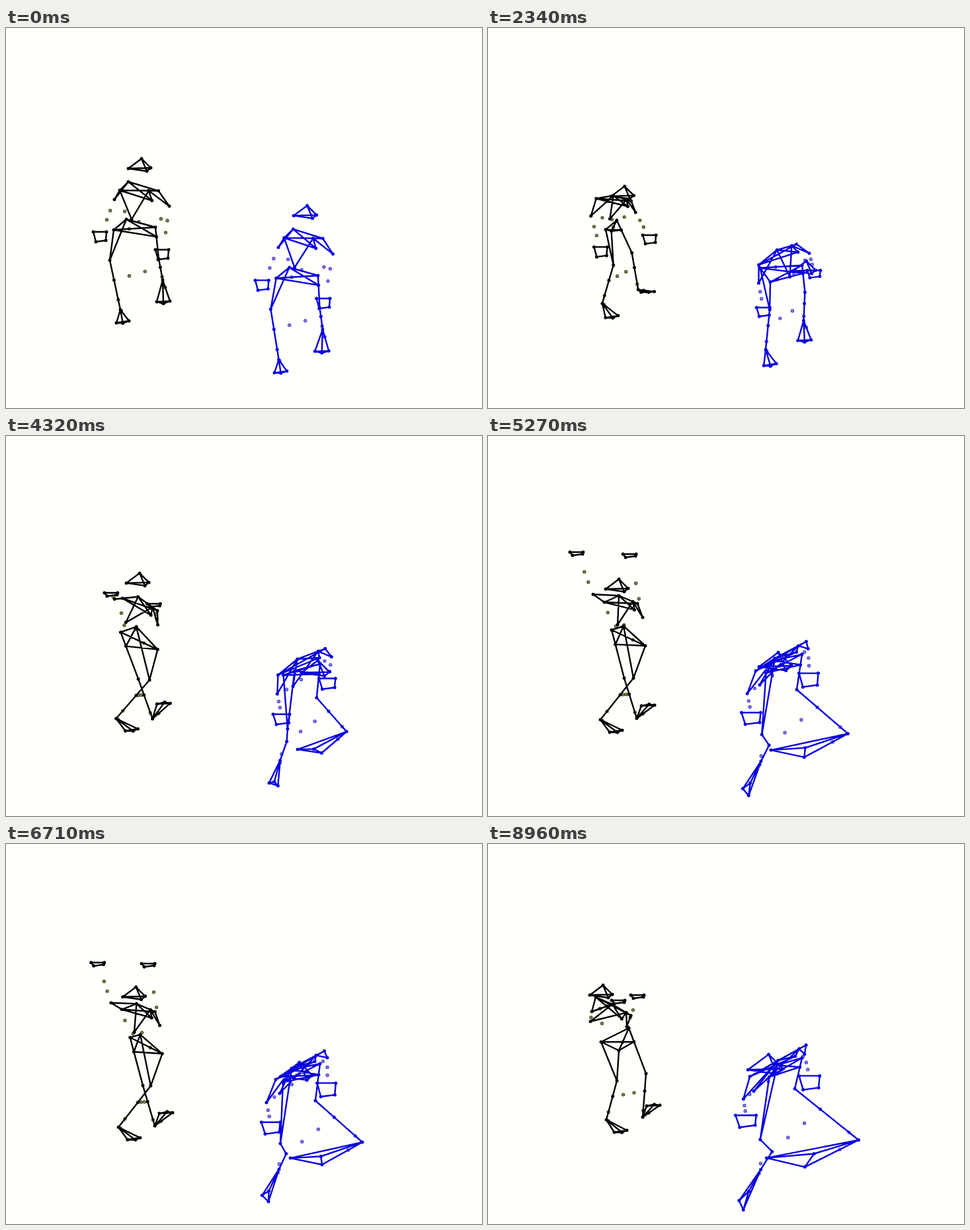
An HTML page for the animation above (9.01 s loop, 720 by 576 pixels).

```html
<!DOCTYPE html>
<html lang="en">
<head>
<meta charset="utf-8">
<title>Two dancers</title>
<style>
html, body { margin: 0; width: 100%; height: 100%; overflow: hidden; background: #fffffb; }
svg { display: block; width: 100vw; height: 100vh; }
path { fill: none; stroke-linecap: round; stroke-linejoin: round; }
</style>
</head>
<body>
<svg id="stage" viewBox="0 0 720 576"></svg>
<script>
const LOOP = 9010, STEP = 45, LAST = 199;
const KEYS = [0, 29, 74, 117, 149, 178, 199];

const mix = (a, b, t) => [a[0] + (b[0] - a[0]) * t, a[1] + (b[1] - a[1]) * t];
const add = (a, x, y) => [a[0] + x, a[1] + y];
const clamp = v => Math.max(0, Math.min(1, v));

const mapPose = (pose, fn) =>
  Object.fromEntries(Object.entries(pose).map(([name, p]) => [name, fn(p, name)]));
const blend = (a, b, t) => mapPose(a, (p, name) => mix(p, b[name], t));

// Key joints only; everything else on the body is worked out in build().
const stand = {
  head: [203, 210], neck: [185, 233], spine: [172, 246], waist: [190, 290],
  armL: [164, 260], armR: [247, 270], handL: [143, 316], handR: [237, 343],
  hipL: [163, 306], sacrum: [182, 290], hipR: [226, 302],
  kneeL: [157, 352], ankleL: [173, 427], toeL: [186, 444],
  kneeR: [231, 350], ankleR: [237, 382], toeR: [248, 414]
};
const bow = {
  head: [204, 280], neck: [157, 271], spine: [178, 259], waist: [202, 298],
  armL: [145, 303], armR: [226, 262], handL: [156, 350], handR: [246, 297],
  hipL: [160, 290], sacrum: [172, 315], hipR: [228, 285],
  kneeL: [168, 348], ankleL: [181, 412], toeL: [197, 433],
  kneeR: [238, 320], ankleR: [236, 370], toeR: [257, 400]
};
const turn = {
  head: [204, 218], neck: [174, 243], spine: [199, 247], waist: [170, 281],
  armL: [167, 260], armR: [225, 294], handL: [185, 308], handR: [233, 329],
  hipL: [214, 325], sacrum: [187, 293], hipR: [167, 299],
  kneeL: [209, 370], ankleL: [165, 425], toeL: [196, 441],
  kneeR: [199, 364], ankleR: [220, 423], toeR: [246, 402]
};
const reach = {
  head: [196, 229], neck: [176, 252], spine: [198, 242], waist: [196, 286],
  armL: [159, 240], armR: [234, 275], handL: [135, 178], handR: [215, 181],
  hipL: [238, 318], sacrum: [205, 288], hipR: [187, 294],
  kneeL: [220, 367], ankleL: [170, 430], toeL: [203, 446],
  kneeR: [206, 367], ankleR: [225, 428], toeR: [252, 408]
};
const fold = {
  head: [172, 226], neck: [163, 232], spine: [188, 243], waist: [162, 272],
  armL: [157, 254], armR: [210, 277], handL: [216, 240], handR: [231, 220],
  hipL: [210, 315], sacrum: [174, 303], hipR: [198, 280],
  kneeL: [202, 361], ankleL: [171, 419], toeL: [202, 435],
  kneeR: [222, 349], ankleR: [226, 415], toeR: [252, 396]
};
const step = {
  ...fold, waist: [155, 269], handL: [198, 239], handR: [227, 231],
  hipL: [198, 313], sacrum: [171, 300], hipR: [213, 279],
  kneeL: [195, 359], ankleL: [179, 418], toeL: [210, 434],
  kneeR: [239, 348], ankleR: [234, 414], toeR: [260, 396]
};
const stoop = {
  head: [498, 364], neck: [417, 366], spine: [445, 339], waist: [457, 381],
  armL: [425, 390], armR: [498, 346], handL: [435, 430], handR: [486, 380],
  hipL: [417, 366], sacrum: [437, 374], hipR: [475, 360],
  kneeL: [435, 434], ankleL: [417, 490], toeL: [430, 514],
  kneeR: [474, 408], ankleR: [484, 445], toeR: [479, 474]
};
const crouch = {
  head: [441, 348], neck: [408, 357], spine: [432, 340], waist: [414, 378],
  armL: [394, 392], armR: [486, 324], handL: [402, 430], handR: [486, 372],
  hipL: [419, 361], sacrum: [432, 342], hipR: [475, 333],
  kneeL: [415, 454], ankleL: [413, 493], toeL: [397, 542],
  kneeR: [468, 389], ankleR: [539, 452], toeR: [478, 486]
};
const lunge = {
  head: [392, 322], neck: [378, 346], spine: [449, 310], waist: [384, 370],
  armL: [375, 378], armR: [468, 310], handL: [376, 404], handR: [490, 345],
  hipL: [435, 341], sacrum: [446, 325], hipR: [475, 311],
  kneeL: [407, 439], ankleL: [412, 494], toeL: [370, 573],
  kneeR: [458, 344], ankleR: [593, 444], toeR: [481, 495]
};

// The blue dancer mirrors the first two poses from a nearer spot.
const beside = pose => mapPose(pose, ([x, y]) =>
  [x + 246 - .05 * (y - 300), y + 73 + .02 * (y - 290)]);

const blackPoses = [stand, bow, turn, reach, blend(reach, fold, .06), fold, step];
const bluePoses = [beside(stand), beside(bow), stoop, blend(crouch, lunge, .1),
  crouch, lunge, blend(crouch, lunge, .4)];

// Cubic curve through the key poses, with slopes taken from the neighbours.
function poseAt(poses, frame) {
  let k = 0;
  while (k < KEYS.length - 2 && frame >= KEYS[k + 1]) k++;
  const span = KEYS[k + 1] - KEYS[k], u = (frame - KEYS[k]) / span;
  const slope = (j, name, axis) => {
    const a = Math.max(j - 1, 0), b = Math.min(j + 1, KEYS.length - 1);
    return (poses[b][name][axis] - poses[a][name][axis]) / (KEYS[b] - KEYS[a]) * span;
  };
  const pose = mapPose(poses[k], (p, name) => p.map((from, axis) => {
    const d = poses[k + 1][name][axis] - from;
    const s = slope(k, name, axis), e = slope(k + 1, name, axis);
    return from + u * (s + u * (3 * d - 2 * s - e + u * (s + e - 2 * d)));
  }));
  const swing = 38 * Math.abs(Math.sin(Math.PI * frame / KEYS[1])) * Math.exp(-frame / 30);
  pose.handL = add(pose.handL, -swing, 0);
  pose.handR = add(pose.handR, swing, 0);
  return pose;
}

// Turns the key joints into edges between points, and free markers.
function build(j) {
  const edges = [], loose = [];
  const star = (from, ...ends) => ends.forEach(p => edges.push([from, p]));
  const ring = (a, b, c, d) => edges.push([a, b], [b, c], [c, d], [d, a]);
  const mesh = (a, b, c, d) => { ring(a, b, c, d); edges.push([a, c], [b, d]); };
  const mark = (a, b, ...steps) => steps.forEach(t => loose.push(mix(a, b, t)));

  const wide = clamp((Math.abs(j.ankleR[0] - j.ankleL[0]) - 64) / 120);
  const size = 1 + .8 * wide;

  const at = (x, y) => add(j.head, x * size, y * size);
  mesh(at(2, -12), at(16, 2), at(10, 7), at(-18, 3));

  const lift = [j.waist[0] - j.spine[0], j.waist[1] - j.spine[1]];
  const shoulder = add(mix(j.armR, j.neck, .15), -.4 * lift[0], -.4 * lift[1]);
  const blade = mix(shoulder, j.spine, .25);
  const rib = mix(j.armR, j.spine, .35);
  star(j.neck, shoulder, j.spine, j.armL, rib);
  star(j.spine, j.armL, shoulder, rib, j.waist);
  star(blade, j.waist, j.armR, rib);
  star(shoulder, j.armR);

  const seat = mix(j.hipR, j.kneeR, .3);
  mesh(j.sacrum, j.hipL, seat, j.hipR);

  const shinL = add(mix(j.kneeL, j.ankleL, .4), 36 * wide * wide, 0);
  const shinR = mix(j.kneeR, j.ankleR, .4);
  star(j.kneeL, j.hipL, j.sacrum, shinL);
  star(j.kneeR, j.hipR, seat, shinR);
  star(shinL, j.ankleL);
  star(shinR, j.ankleR);

  const foot = (ankle, toe, heel) =>
    mesh(ankle, heel, mix(mix(heel, toe, .5), ankle, .7 * wide - .1), toe);
  foot(j.ankleL, j.toeL, add(j.toeL, -19 + 18 * wide, 3 - 24 * wide));
  foot(j.ankleR, j.toeR, add(j.toeR, -20 - 54 * wide, 1 - 21 * wide));

  // A hand held above its shoulder is seen edge-on.
  for (const [arm, hand] of [[j.armL, j.handL], [j.armR, j.handR]]) {
    const h = 2 + 5 * clamp((hand[1] - arm[1]) / 50);
    const corner = (x, y) => add(hand, x * size, y * size);
    ring(corner(-11, -h), corner(9, -h), corner(8, h - 1), corner(-7, h + 1));
    mark(arm, hand, .3, .55);
  }
  mark(j.armL, j.waist, .6);
  mark(j.waist, j.hipR, .3);
  mark(j.armR, j.hipR, .6);
  mark(j.hipL, j.hipR, .37);
  mark(shinL, shinR, .33, .67);
  mark(j.kneeR, j.ankleR, .85);
  mark(j.ankleR, j.toeR, .35);
  mark(j.kneeL, j.ankleL, .8);
  mark(j.ankleL, j.toeL, .1);
  return { edges, loose };
}

function addPath(color, width) {
  const path = document.createElementNS('http://www.w3.org/2000/svg', 'path');
  path.setAttribute('stroke', color);
  path.setAttribute('stroke-width', width);
  document.getElementById('stage').append(path);
  return path;
}

const makeDancer = (poses, color, rim, core) => ({
  poses,
  rim: addPath(rim, 5.4),
  core: addPath(core, 3.4),
  lines: addPath(color, 2.4),
  joints: addPath(color, 5)
});

const dancers = [
  makeDancer(blackPoses, '#000', '#4c4c22', '#80804a'),
  makeDancer(bluePoses, '#0900e0', '#493fc8', '#8480ee')
];

const xy = p => p.map(v => v.toFixed(1)).join(' ');
const dots = points => points.map(p => `M${xy(p)}h0`).join('');

function draw(dancer, frame) {
  const { edges, loose } = build(poseAt(dancer.poses, frame));
  dancer.lines.setAttribute('d', edges.map(([a, b]) => `M${xy(a)}L${xy(b)}`).join(''));
  dancer.joints.setAttribute('d', dots(edges.flat()));
  dancer.rim.setAttribute('d', dots(loose));
  dancer.core.setAttribute('d', dots(loose));
}

const start = performance.now();
function tick() {
  const time = (performance.now() - start) % LOOP;
  const frame = Math.min(LAST, Math.floor(time / STEP));
  dancers.forEach(dancer => draw(dancer, frame));
  requestAnimationFrame(tick);
}
tick();
</script>
</body>
</html>
```
